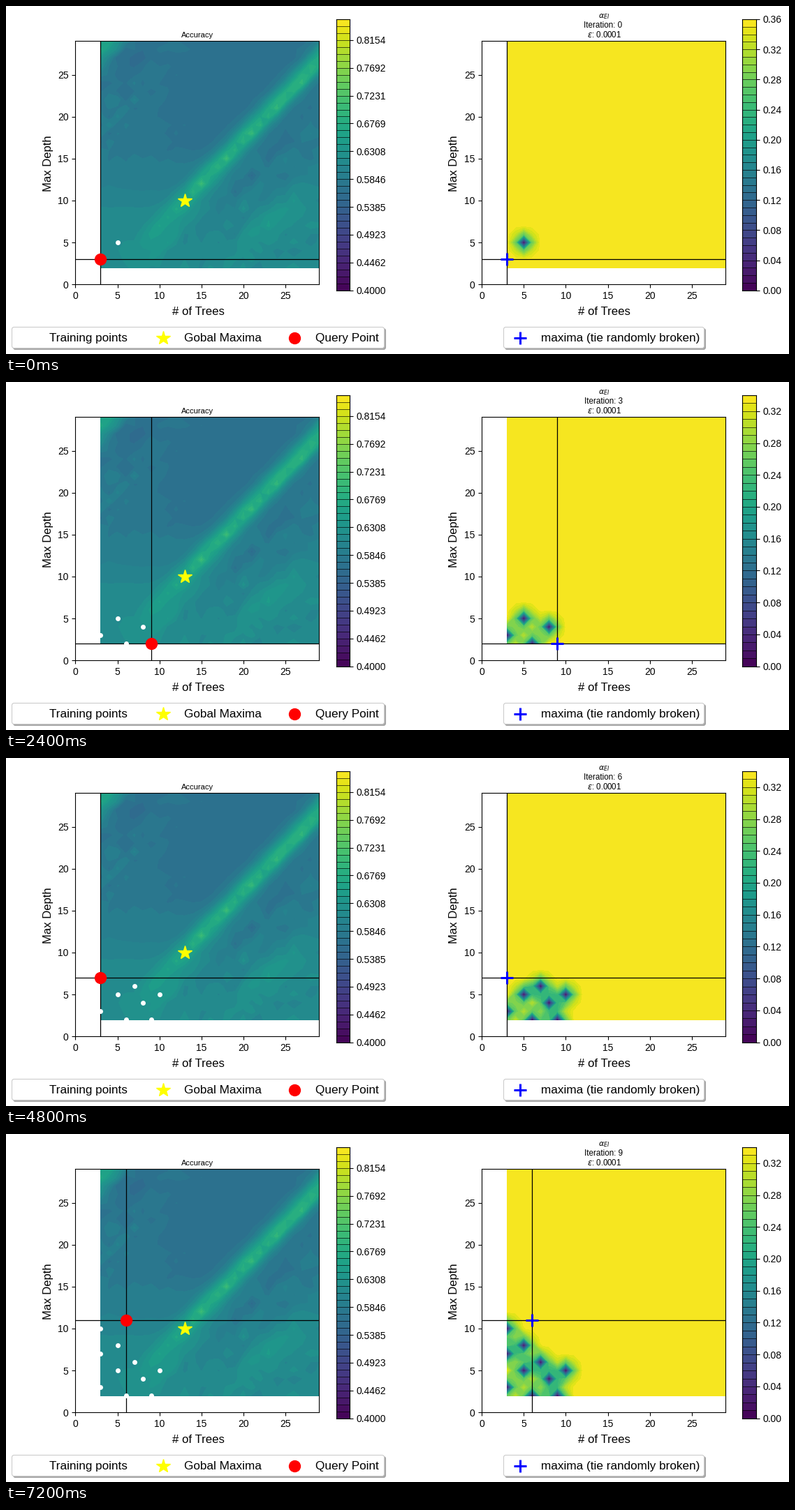
A matplotlib script for the animation above (8000 ms loop, 1121 by 499 pixels).

```python
import numpy as np
import matplotlib.pyplot as plt
from matplotlib.animation import FuncAnimation
from matplotlib.patches import FancyBboxPatch

W, H, DPI = 1121, 499, 100
plt.rcParams.update({"font.family": "Liberation Sans", "font.size": 10})

START = (5, 5)
QUERIES = [(3, 3), (6, 2), (8, 4), (9, 2), (10, 5),
           (7, 6), (3, 7), (5, 8), (3, 10), (6, 11)]
X, Y = np.meshgrid(np.arange(3, 30), np.arange(2, 30))

fig = plt.figure(figsize=(W / DPI, H / DPI), dpi=DPI, facecolor="white")


def px_axes(x, y, w, h, **kw):
    return fig.add_axes([x / W, 1 - (y + h) / H, w / W, h / H], **kw)


def sigmoid(t):
    return 1 / (1 + np.exp(-t))


def bump(t, center, width):
    return np.exp(-((t - center) / width) ** 2)


def accuracy():
    rng = np.random.default_rng(4)
    d = X - Y
    diagonal = rng.normal(0, 1, 60)[d + 30]
    speckle = rng.normal(0, 1, X.shape)
    z = 0.568 + 0.013 * sigmoid((15.5 - Y) / 0.5) + 0.033 * sigmoid((10.5 - Y) / 1.6)
    z += 0.002 * rng.normal(0, 1, 28)[:, None]
    # Upper left: faint diagonal streaks and a bright corner
    left = sigmoid((9 - X) / 2) * sigmoid((Y - 14) / 1.5)
    z += left * (0.018 + 0.008 * diagonal + 0.007 * speckle)
    z -= 0.03 * bump(d, -19.5, 1.8) * bump(X, 6, 4)
    z += 0.08 * bump(d, -25.5, 2.2)
    # Right of the ridge: alternating streaks with speckles
    right = sigmoid((d - 6) * 1.5)
    z += right * (0.014 * sigmoid((Y - 10) / 2) + 0.004 * diagonal + 0.005 * speckle)
    z -= 0.016 * bump(d, 8.5, 1.8) * bump(X, 20, 5) * (1 + (X % 2))
    z -= 0.012 * bump(d, 12, 1.2) * bump(X, 22, 6)
    z += 0.026 * bump(d, 15.5, 1.7) * bump(Y, 8, 4)
    z += 0.025 * bump(d, 6, 1) * bump(X, 10.5, 2.5)
    z += 0.02 * bump(X, 6, 1) * bump(Y, 4, 1)
    # Main ridge with bright knots along one diagonal
    center = 3.2 - 0.05 * (X - 8)
    rise = 0.45 * sigmoid((X - 7.5) * 2) + 0.55 * sigmoid((X - 12) / 1.5)
    weight = bump(d, center, 1.8) * rise
    z += weight * (0.68 + 0.006 * speckle - z)
    z += 0.03 * (d == 3) * (X > 12) * (0.4 + 0.6 * (X % 3 == 0))
    return np.clip(z, 0.41, 0.84)


def kernel(a, b):
    return np.exp(-0.5 * ((a[:, None] - b[None]) ** 2).sum(-1))


def acquisition(train, peak):
    grid = np.column_stack([X.ravel(), Y.ravel()]).astype(float)
    k = kernel(grid, train)
    var = 1 - (k @ np.linalg.inv(kernel(train, train)) * k).sum(1)
    sigma = np.sqrt(np.clip(var, 0, 1)).reshape(X.shape)
    return np.clip(0.4 * (sigma - 1) + peak, 0, peak)


def color_bar(ax, levels, ticks, fmt):
    ax.clear()
    mids = (levels[:-1] + levels[1:]) / 2
    ax.pcolormesh([0, 1], levels, mids[:, None], cmap="viridis",
                  vmin=levels[0], vmax=levels[-1])
    ax.hlines(levels[1:-1], 0, 1, color="black", lw=0.45)
    ax.set(xlim=(0, 1), ylim=(levels[0], levels[-1]), xticks=[])
    ax.yaxis.tick_right()
    ax.set_yticks(ticks, [fmt % t for t in ticks])


def surface(ax, z, levels, query):
    ax.clear()
    ax.contourf(X, Y, z, levels=levels, cmap="viridis")
    ax.axvline(query[0], color="black", lw=0.9)
    ax.axhline(query[1], color="black", lw=0.9)
    ax.set(xlim=(0, 29), ylim=(0, 29), xticks=range(0, 26, 5), yticks=range(0, 26, 5))


STAR = dict(marker="*", ms=15, color="yellow", ls="none")
DOT = dict(marker=".", ms=25, color="red", ls="none", mec="none")
PLUS = dict(marker="+", ms=13, mew=2.2, color="blue", ls="none")
WHITE = dict(marker="o", ms=5, color="white", ls="none", mec="none")

page = px_axes(0, 0, W, H, zorder=-1)
page.set(xlim=(0, W), ylim=(H, 0))
page.axis("off")


def label(x, y, s, size, ha="center", rotation=0):
    return page.text(x, y, s, size=size, ha=ha, va="baseline",
                     rotation=rotation, rotation_mode="anchor")


def legend_box(x0, x1):
    for shift, face, edge in ((2, "#a6a6a6", "#a6a6a6"), (0, "white", "#cccccc")):
        page.add_patch(FancyBboxPatch(
            (x0 + shift, 460.4 + shift), x1 - x0, 30, fc=face, ec=edge, lw=0.8,
            boxstyle="round,pad=0,rounding_size=3", snap=True))


legend_box(8.4, 541.2)
legend_box(712.4, 999.2)
for x, text in ((62, "Training points"), (255, "Gobal Maxima"),
                (443, "Query Point"), (766, "maxima (tie randomly broken)")):
    label(x, 481, text, 12.35, ha="left")
for x, style in ((225.2, STAR), (412.8, DOT), (735.6, PLUS)):
    page.plot(x, 475.8, **style)
for x in (275, 856):
    label(x, 443, "# of Trees", 12.1)
    label(x - 210, 226, "Max Depth", 12, rotation=90)
label(274.5, 44.5, "Accuracy", 8)
label(856, 17, r"$\alpha_{EI}$", 8)
iteration_text = label(855, 31, "", 8.4)
label(857, 44.5, r"$\epsilon$: 0.0001", 8.3)

SIDE = 348.8
left_ax = px_axes(99.4, 50.4, SIDE, SIDE)
right_ax = px_axes(681.2, 50.4, SIDE, SIDE)
left_bar = px_axes(472.6, 18.9, 19.4, 388.8)
right_bar = px_axes(1054.4, 18.9, 19.4, 388.8)

ACCURACY = accuracy()
ACC_LEVELS = np.linspace(0.4, 0.85, 40)
color_bar(left_bar, ACC_LEVELS, ACC_LEVELS[::4], "%.4f")


def draw(i):
    query = QUERIES[i]
    train = np.array([START] + QUERIES[:i], float)
    bands = 36 if i < 3 else 34
    levels = np.arange(bands + 1) / 100

    surface(left_ax, ACCURACY, ACC_LEVELS, query)
    left_ax.plot(train[:, 0], train[:, 1], **WHITE)
    left_ax.plot(13, 10, **STAR)
    left_ax.plot(*query, **DOT)

    surface(right_ax, acquisition(train, bands / 100 - 0.004), levels, query)
    right_ax.plot(*query, **PLUS)
    color_bar(right_bar, levels, levels[::4], "%.2f")
    iteration_text.set_text(f"Iteration: {i}")
    return []


anim = FuncAnimation(fig, draw, frames=len(QUERIES), interval=800,
                     repeat=True, repeat_delay=0, blit=False)
plt.show()
```
